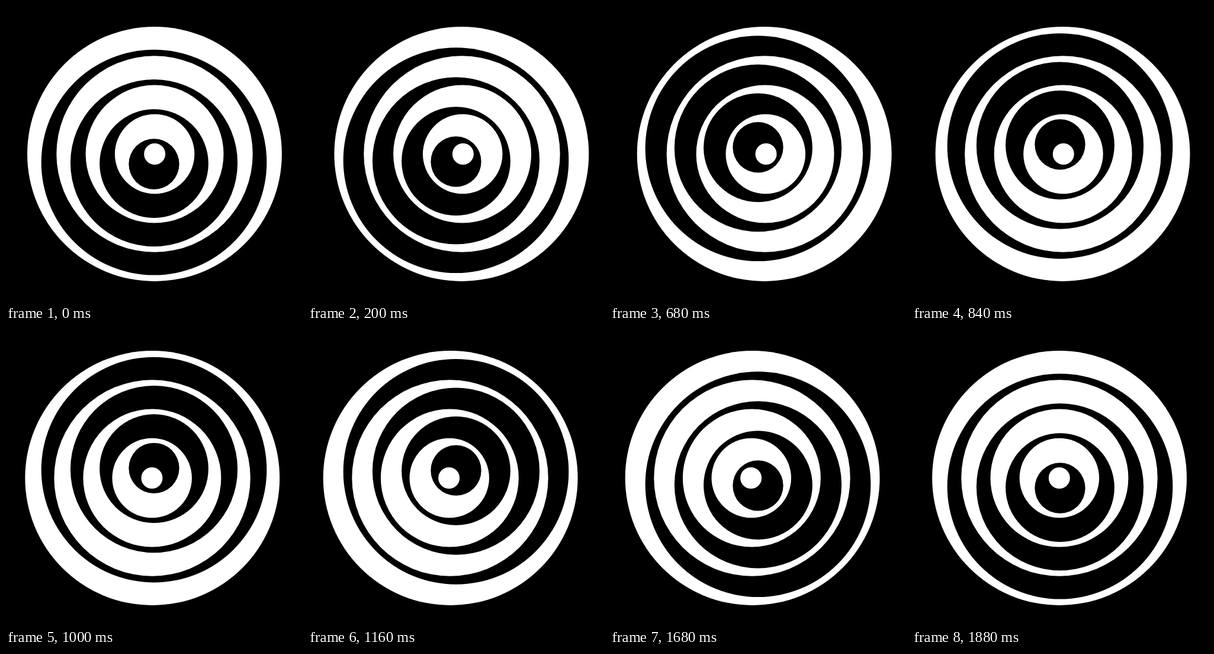
Animation, 500 px wide and 500 px high, one loop 1920 ms. Source, as an HTML page with a canvas:

```html
<!DOCTYPE html>
<html lang="en">
<head>
<meta charset="utf-8">
<title>Swaying rings</title>
<style>
  html, body { margin: 0; height: 100%; overflow: hidden; background: #000; }
  canvas { display: block; }
</style>
</head>
<body>
<canvas id="stage" width="500" height="500"></canvas>
<script>
const ctx = document.getElementById('stage').getContext('2d');
const LOOP = 1920, STEP = 40, CENTER = 250, GAP = 49.25;

function disc(x, y, radius, color) {
  ctx.fillStyle = color;
  ctx.beginPath();
  ctx.arc(x, y, radius, 0, Math.PI * 2);
  ctx.fill();
}

function draw(now) {
  const tick = Math.floor(now % LOOP / STEP) + 0.5;
  const angle = tick * STEP / LOOP * Math.PI * 2;

  ctx.fillStyle = '#000';
  ctx.fillRect(0, 0, 500, 500);

  // White discs sway sideways, black discs bob; smaller ones travel further.
  for (let i = 0; i < 5; i++) {
    const reach = 14.2 + 0.95 * i;
    disc(CENTER + reach * Math.sin(angle), CENTER, 215 - GAP * i, '#fff');
    if (i < 4) disc(CENTER, CENTER + reach * Math.cos(angle), 190.4 - GAP * i, '#000');
  }
  requestAnimationFrame(draw);
}

draw(0);
</script>
</body>
</html>
```
